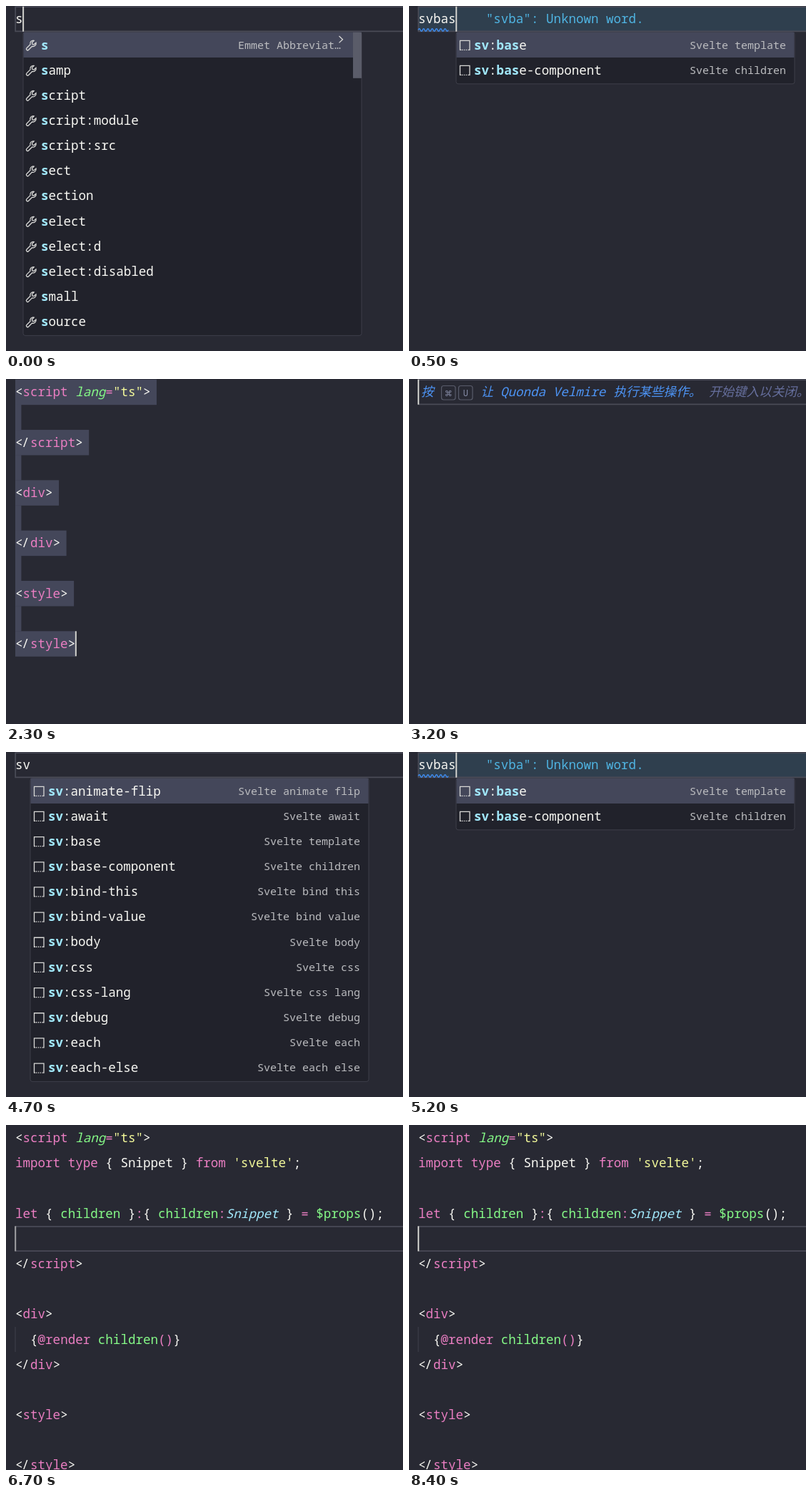
Write an HTML page that moves like this. It is 556 by 482 pixels and loops after 8700 ms.

```html
<!DOCTYPE html>
<html lang="en">
<head>
<meta charset="utf-8">
<title>Snippet completion</title>
<style>
  html, body { margin: 0; width: 100%; height: 100%; overflow: hidden; background: #282933; }
  svg { display: block; }
  text {
    font: 500 17.55px 'Noto Sans Mono', 'Noto Sans CJK SC', 'Noto Sans CJK', monospace;
    white-space: pre;
    fill: #f8f8f3;
  }
  .p { fill: #ea7ec2; }
  .g { fill: #85f987; }
  .y { fill: #f3f99a; }
  .G { fill: #85f987; font-style: italic; }
  .C { fill: #a1e8fb; font-style: italic; }
  .hit { fill: #a1e8fb; font-weight: 700; }
  .detail { font-size: 15px; font-weight: 400; fill: #bcbdc0; text-anchor: end; }
  .hint { fill: #4d94f5; font-style: italic; }
  .dim { fill: #666f9d; font-style: italic; }
  .key { font-size: 12px; font-weight: 400; fill: #858ba5; text-anchor: middle; }
  .cmd { font: 11px 'DejaVu Sans', sans-serif; }
  .lens { fill: #4fb4e2; font-weight: 400; }
  .icon { fill: none; stroke: #d8d8d6; stroke-width: 1.3; }
</style>
</head>
<body>
<svg width="556" height="482" viewBox="0 0 556 482">
  <g id="scene"></g>
  <rect id="cursor" width="2" height="35" fill="#d0d0cc"/>
</svg>
<script>
const LOOP = 8700, STEP = 100;
const LEFT = 13, CHAR = 10.53, ROW = 35.16;
const colX = col => LEFT + col * CHAR;
const rowY = row => 0.7 + row * ROW;
const esc = s => s.replace(/&/g, '&amp;').replace(/</g, '&lt;');

const rect = (x, y, w, h, fill, extra = '') =>
  `<rect x="${x}" y="${y}" width="${w}" height="${h}" fill="${fill}" ${extra}/>`;
const text = (x, y, s, cls = '') => `<text x="${x}" y="${y}" class="${cls}">${s}</text>`;
const baseline = row => rowY(row) + 23.6;

// Each token is a colour class, a colon and its text; tokens are split by "|".
const tag = (name, close) => close ? `w:</|p:${name}|w:>` : `w:<|p:${name}|w:>`;
const OPEN_SCRIPT = 'w:<|p:script |G:lang|p:=|y:"ts"|w:>';

const BASE = [
  OPEN_SCRIPT, '', tag('script', 1), '',
  tag('div'), '', tag('div', 1), '',
  tag('style'), '', tag('style', 1)
];
const COMPONENT = [
  OPEN_SCRIPT,
  "p:import type|w: { Snippet } |p:from|y: 'svelte'|w:;",
  '',
  'p:let|w: { |g:children|w: }|p::|w:{ |g:children|p::|C:Snippet|w: } |p:=|g: $props|w:();',
  '', tag('script', 1), '',
  tag('div'), 'w:  {|p:@render |g:children|p:()|w:}', tag('div', 1), '',
  tag('style'), '', tag('style', 1)
];

const tokens = line => line ? line.split('|').map(t => [t[0], t.slice(2)]) : [];
const lineLength = line => tokens(line).reduce((n, [, s]) => n + s.length, 0);

function codeLine(line, row) {
  let col = 0;
  return tokens(line).map(([cls, s]) => {
    const shape = esc(s).replace('&lt;/', '&lt;<tspan dx="-1.5">/</tspan>');
    const out = text(colX(col), baseline(row), shape, cls);
    col += s.length;
    return out;
  }).join('');
}
const code = lines => lines.map(codeLine).join('');

const lineFrame = (row, fill = 'none') =>
  rect(LEFT + 0.2, rowY(row) + 0.5, 560, ROW - 1, fill, 'stroke="#4a4b57" stroke-width="1.7"');

const guide = row => rect(LEFT - 0.5, rowY(row), 1, ROW, '#3f404c');

const selection = lines => lines.map((line, row) => {
  const cols = lineLength(line) + (row < lines.length - 1 ? 0.8 : 0);
  return rect(LEFT, rowY(row), cols * CHAR, ROW + 0.3, '#44475a');
}).join('');

const EMMET = ('s samp script script:module script:src sect section select ' +
  'select:d select:disabled small source').split(' ').map(label => [label, '']);
EMMET[0][1] = 'Emmet Abbreviat…';

const SVELTE = [
  ['animate-flip'], ['await'], ['base', 'template'], ['base-component', 'children'],
  ['bind-this', 'bind this'], ['bind-value', 'bind value'], ['body'], ['css'],
  ['css-lang', 'css lang'], ['debug'], ['each'], ['each-else', 'each else']
].map(([name, detail = name.replace('-', ' ')]) => ['sv:' + name, 'Svelte ' + detail]);

// Marks the typed letters inside a label; null when they do not all occur.
function markMatch(label, query) {
  let used = 0;
  const html = [...label].map(ch =>
    ch === query[used] ? (used++, `<tspan class="hit">${ch}</tspan>`) : ch).join('');
  return used === query.length ? html : null;
}

const wrench = (x, y) => `<path class="icon" transform="translate(${x} ${y})"
  d="M11.6 1.5A4.3 4.3 0 0 0 6.5 6.9L1.5 11.9A1.8 1.8 0 0 0 4.1 14.5L9.1 9.5A4.3 4.3 0 0 0 14.5 4.4L11.8 7L9.4 6.6L9 4.2Z"/>`;
const box = (x, y) => `<path class="icon" transform="translate(${x} ${y})"
  d="M2.8 14H1V1H14.5V14H12.7"/><path class="icon" stroke-dasharray="1.4 1.4"
  d="M${x + 3.5} ${y + 14}h9"/>`;

function popup(query, selected = 0) {
  const emmet = query === 's';
  const x = Math.round(colX(query.length)), top = 36.8;
  const items = (emmet ? EMMET : SVELTE)
    .map(([label, detail]) => [markMatch(label, query), detail])
    .filter(([html]) => html);
  const rows = items.map(([html, detail], i) => {
    const y = top + i * ROW;
    return (i === selected ? rect(x + 0.5, y, 473, ROW, '#44475a') : '') +
      (emmet ? wrench(x + 3.5, y + 10) : box(x + 4.5, y + 10.5)) +
      text(x + 25, y + 23.7, html) +
      text(x + (emmet ? 445 : 462), y + 22.8, detail, 'detail');
  }).join('');
  const extras = emmet
    ? rect(x + 462, top, 12, 64, '#5a5c69') +
      `<path class="icon" d="M${x + 442.5} 42l5 4.7l-5 4.7"/>`
    : '';
  return rect(x, top - 0.3, 474, items.length * ROW + 2, '#21222b',
    'rx="3" stroke="#3e3f4a"') + rows + extras;
}

function squiggle(chars) {
  const waves = Math.round(chars * CHAR / 6);
  return `<path fill="none" stroke="#3f8cf0" stroke-width="1.5"
    d="M${LEFT} 33.5${'q1.5 -3.5 3 0t3 0'.repeat(waves)}"/>`;
}

// A typed word, its completion list and, if given, the word being flagged.
function typing(word, flagged = '', selected = 0) {
  const lens = flagged &&
    text(colX(word.length + 4), baseline(0), `"${flagged}": Unknown word.`, 'lens') +
    squiggle(flagged.length);
  return lineFrame(0, flagged ? '#2f3f4e' : 'none') + text(LEFT, baseline(0), word) +
    lens + popup(word, selected);
}

const keycap = (x, label, cls) =>
  rect(x, 9.5, 19.5, 19.5, 'none', 'rx="3" stroke="#595c6b" stroke-width="1.2"') +
  text(x + 9.8, 23.5, label, 'key ' + cls);

const hint = () => lineFrame(0) +
  text(17, 24.3, '按', 'hint') + keycap(45.5, '⌘', 'cmd') + keycap(69.5, 'U', '') +
  text(100.5, 24.3, '让', 'hint') +
  text(128, 24.3, 'Quonda Velmire', 'hint') +
  text(286.5, 24.3, '执行某些操作。', 'hint') +
  text(420, 24.3, '开始键入以关闭。', 'dim');

const typed = (at, word, flagged, selected, fadeAt) =>
  ({ at, html: typing(word, flagged, selected), col: word.length, row: 0, fadeAt });

const scenes = [
  typed(0, 's'),
  typed(100, 'sv'),
  typed(300, 'svb'),
  typed(400, 'svba'),
  typed(500, 'svbas', 'svba'),
  typed(600, 'svbase', 'svba'),
  typed(700, 'svbase', 'svbase'),
  { at: 800, html: lineFrame(5) + code(BASE), col: 2, row: 5, fadeAt: 1400 },
  { at: 2300, html: selection(BASE) + code(BASE), col: 8, row: 10, fadeAt: 2800 },
  { at: 3100, html: lineFrame(0), col: 0, row: 0 },
  { at: 3200, html: hint(), col: 0, row: 0 },
  typed(3700, 's'),
  typed(3900, 'sv', '', 0, 4500),
  typed(5000, 'svb'),
  typed(5100, 'svba'),
  typed(5200, 'svbas', 'svba'),
  typed(5300, 'svbase', 'svba'),
  typed(5400, 'svbase', 'svbase'),
  typed(5600, 'svbase', 'svbase', 1),
  { at: 5800, html: guide(8) + lineFrame(4) + code(COMPONENT), col: 0, row: 4, fadeAt: 6700 }
];

const BLINK = [0.65, 0.25, 0, 0, 0, 0.25, 0.65, 1, 1, 1];
const sceneNode = document.getElementById('scene');
const cursor = document.getElementById('cursor');
let shown = null;

function draw(time) {
  const t = Math.floor(time % LOOP / STEP) * STEP;
  const scene = scenes.findLast(s => s.at <= t);
  if (scene !== shown) {
    shown = scene;
    sceneNode.innerHTML = scene.html;
    cursor.setAttribute('x', colX(scene.col) - (scene.col ? 0.4 : 0.8));
    cursor.setAttribute('y', rowY(scene.row));
  }
  const fading = t >= (scene.fadeAt ?? LOOP);
  cursor.setAttribute('opacity', fading ? BLINK[(t - scene.fadeAt) / STEP % 10] : 1);
}

const start = performance.now();
function tick() {
  draw(performance.now() - start);
  requestAnimationFrame(tick);
}
tick();
</script>
</body>
</html>
```
